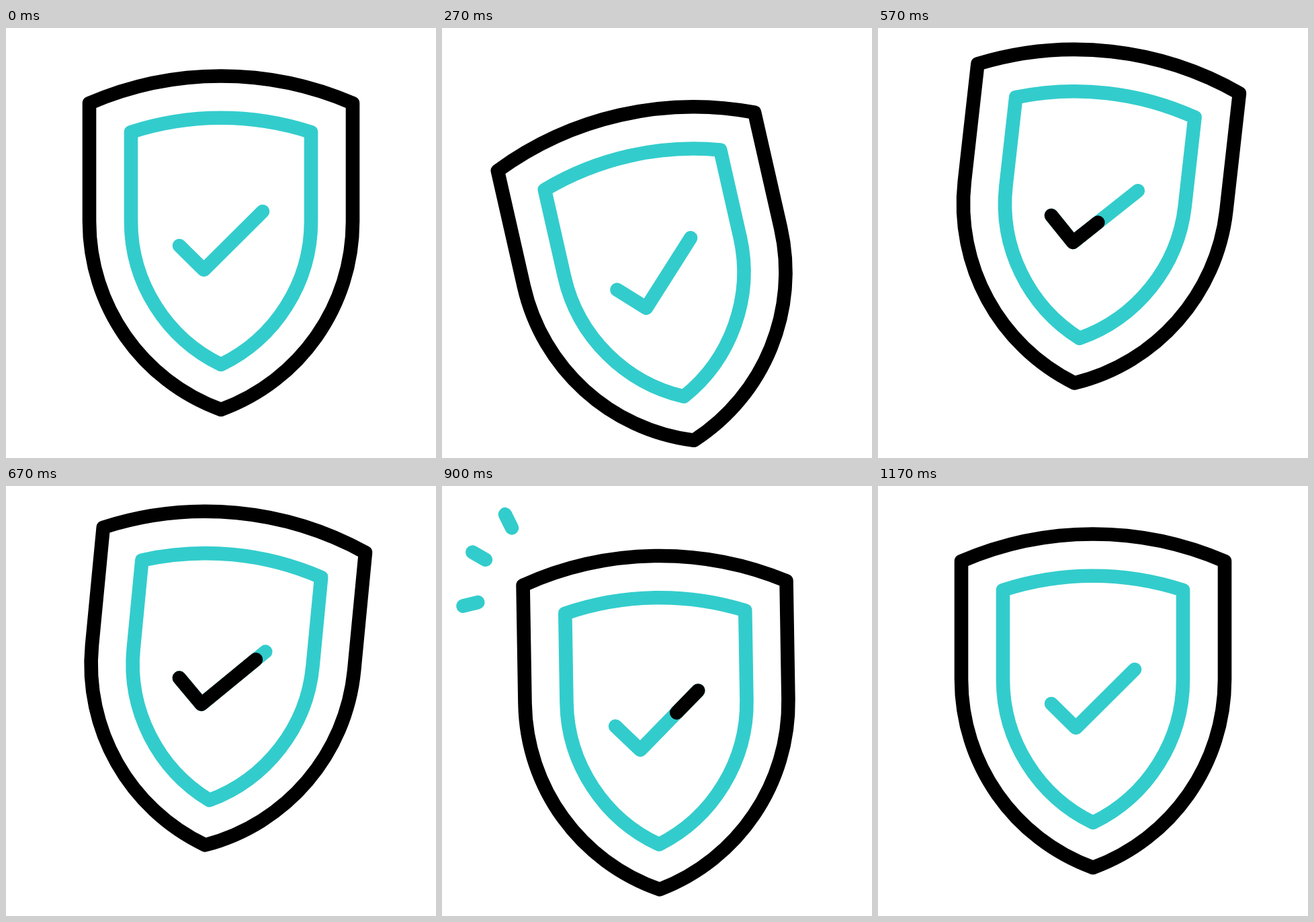
An HTML page with a canvas for the animation above (1670 ms loop, 640x640 px).

```html
<!DOCTYPE html>
<html lang="en">
<head>
<meta charset="utf-8">
<title>Shield</title>
<style>
  html, body { margin: 0; width: 100%; height: 100%; overflow: hidden; background: #fff; }
  canvas { display: block; width: 100vmin; height: 100vmin; }
</style>
</head>
<body>
<canvas id="stage" width="640" height="640"></canvas>
<script>
const ctx = document.getElementById('stage').getContext('2d');
const TEAL = '#33cccc', BLACK = '#000';
const SIZE = 640, CENTER = SIZE / 2;
const LOOP = 1670, STEP = 100 / 3, LAST_STEP = 35;

const outer = shield(196, 112, 494.5, 413, 525, 568);
const inner = shield(134, 155, 433, 379, 462, 501);
const check = new Path2D('M258 324 L294.5 360 L382 273');
const CHECK_LENGTH = 175;
const rays = new Path2D('M124 58 l-25 -52.3 M99.3 90.8 l-50 -29.4 M90.6 128.4 l-56.5 13');
const RAY_LENGTH = 58;

// Arched top, straight sides down to y 288, then a curve on each side to the tip.
function shield(half, top, radius, sidePull, tipPull, tip) {
  const left = CENTER - half, right = CENTER + half, tuck = 0.603 * half;
  return new Path2D(`M${left} ${top} A${radius} ${radius} 0 0 1 ${right} ${top} V288
    C${right} ${sidePull} ${CENTER + tuck} ${tipPull} ${CENTER} ${tip}
    C${CENTER - tuck} ${tipPull} ${left} ${sidePull} ${left} 288 Z`);
}

function ease(step, from, to) {
  const u = Math.min(1, Math.max(0, (step - from) / (to - from)));
  return u * u * (3 - 2 * u);
}

// Eases from 0 through each peak in turn; every swing is shorter than the last by `shrink`.
function swing(step, firstTime, span, shrink, peaks) {
  let value = 0, from = 0, to = firstTime;
  for (const peak of peaks) {
    if (step >= from) value += (peak - value) * ease(step, from, to);
    from = to;
    to += span;
    span *= shrink;
  }
  return value;
}

function stroke(path, color) {
  ctx.strokeStyle = color;
  ctx.stroke(path);
}

function strokePart(path, color, length, start, end) {
  if (end <= start) return;
  ctx.setLineDash([(end - start) * length, 999]);
  ctx.lineDashOffset = -start * length;
  stroke(path, color);
  ctx.setLineDash([]);
}

function draw(step) {
  const tilt = swing(step, 10.9, 7.3, 0.82, [-15.5, 8.1, -4, 1, 0]);
  const drop = swing(step, 7.9, 10.2, 0.88, [52, -41, 32.5, 0]);

  ctx.setTransform(1, 0, 0, 1, 0, 0);
  ctx.fillStyle = '#fff';
  ctx.fillRect(0, 0, SIZE, SIZE);
  ctx.translate(CENTER, CENTER + drop);
  ctx.rotate(tilt * Math.PI / 180);
  ctx.translate(-CENTER, -CENTER);
  ctx.lineWidth = 20.6;
  ctx.lineCap = ctx.lineJoin = 'round';

  stroke(outer, BLACK);
  stroke(inner, TEAL);
  stroke(check, TEAL);
  strokePart(check, BLACK, CHECK_LENGTH, ease(step, 21.1, 30), ease(step, 10.6, 22.4));
  strokePart(rays, TEAL, RAY_LENGTH, ease(step, 23, 30), ease(step, 20.3, 27.3));
}

const begin = performance.now();
function tick() {
  const time = (performance.now() - begin) % LOOP;
  draw(Math.min(LAST_STEP, Math.floor((time + 3.4) / STEP)));
  requestAnimationFrame(tick);
}
tick();
</script>
</body>
</html>
```
